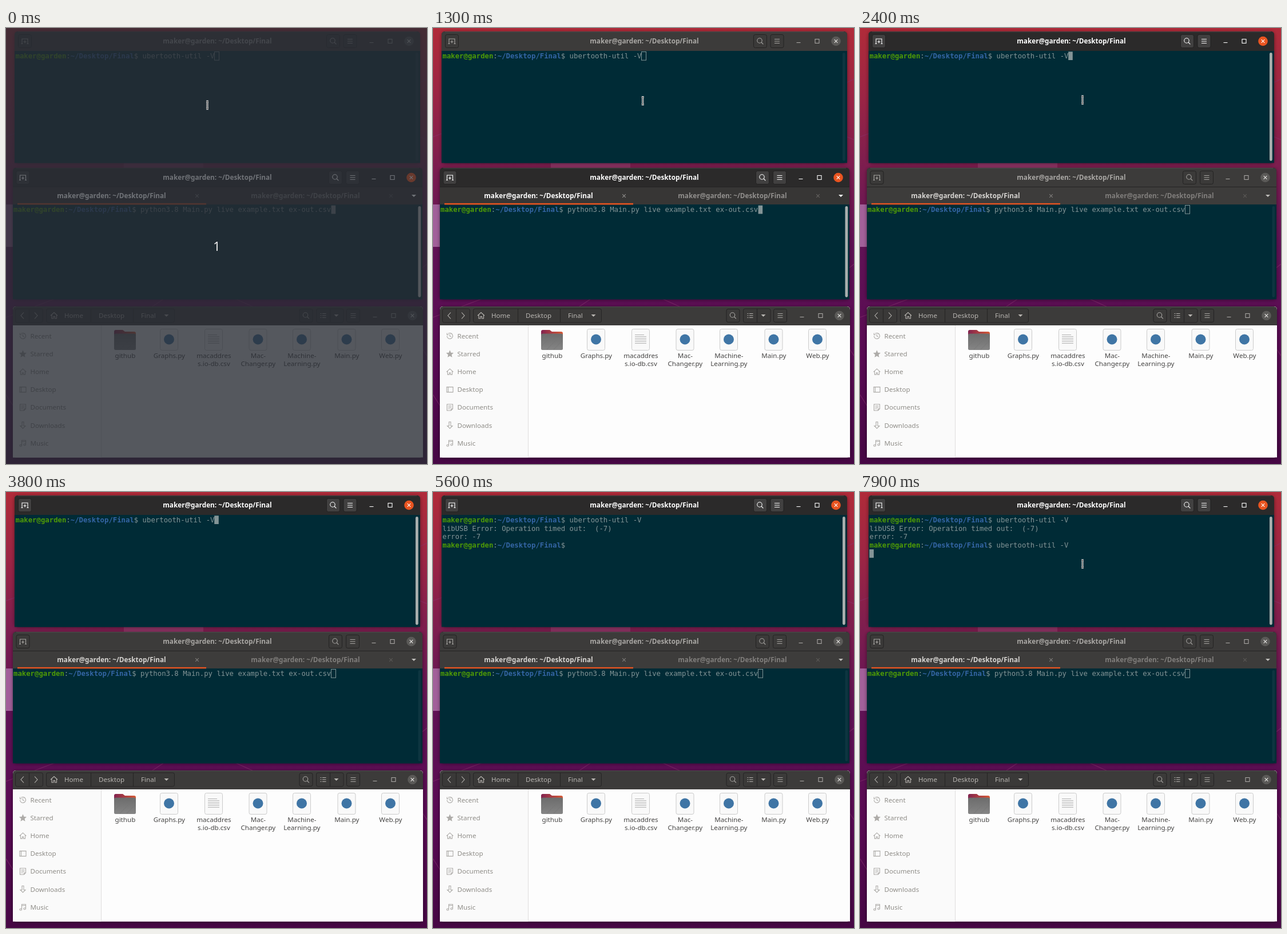
Animation of 736x761 px, one loop 8 s. Source, as an HTML page:

```html
<!DOCTYPE html>
<html lang="en">
<head>
<meta charset="utf-8">
<title>Desktop terminals</title>
<style>
html, body { margin: 0; width: 100%; height: 100%; overflow: hidden; background: #470845; }
svg { display: block; }
text { font-family: "Noto Sans", sans-serif; font-size: 11.6px; white-space: pre; }
.b { font-weight: 700; font-size: 11.75px; }
.t { font-family: "DejaVu Sans Mono", monospace; font-size: 12.3px; fill: #839496; }
.t .b { font-size: 12.3px; }
.m { text-anchor: middle; }
.l { fill: none; stroke-width: 1.1; }
</style>
</head>
<body>
<svg id="stage" width="736" height="761" viewBox="0 0 736 761" xmlns="http://www.w3.org/2000/svg"></svg>
<script>
const LOOP = 8000, COL = 7.4, ROW = 14.7;
const USER = 'maker@garden', DIR = '~/Desktop/Final';
const TITLE = `${USER}: ${DIR}`;
const BRIGHT = '#ffffff', FADED = '#a9a7a4', ORANGE = '#e95420';

const rect = (x, y, w, h, fill, extra = '') =>
  `<rect x="${x}" y="${y}" width="${w}" height="${h}" fill="${fill}" ${extra}/>`;
const line = (d, color, extra = '') => `<path class="l" d="${d}" stroke="${color}" ${extra}/>`;
const text = (x, y, str, fill, cls = '') =>
  `<text x="${x}" y="${y}" fill="${fill}" class="${cls}">${str}</text>`;
const group = (id, body, extra = '') => `<g id="${id}" ${extra}>${body}</g>`;
const down = (x, y, color) => `<path d="M${x - 4} ${y - 2}h8l-4 4z" fill="${color}"/>`;
const cross = (x, y, r, color) =>
  line(`M${x - r} ${y - r}l${2 * r} ${2 * r}M${x + r} ${y - r}l${-2 * r} ${2 * r}`, color);
const topRound = (x, y, w, h, fill) =>
  `<path d="M${x} ${y + h}v${6 - h}q0-6 6-6h${w - 12}q6 0 6 6v${h - 6}z" fill="${fill}"/>`;

const icons = {
  tab: (x, y, c) => line(`M${x - 5} ${y + 4.5}v-8.5h10v8.5M${x - 6.5} ${y + 4.5}h3M${x + 3.5} ${y + 4.5}h3M${x - 2.5} ${y + 1}h5M${x} ${y - 1.5}v5`, c),
  search: (x, y, c) => `<circle class="l" cx="${x - 1}" cy="${y - 1}" r="4.2" stroke="${c}"/>` +
    line(`M${x + 2} ${y + 2}l3.4 3.4`, c),
  menu: (x, y, c) => line(`M${x - 4.5} ${y - 3.5}h9m-9 3.5h9m-9 3.5h9`, c),
  list: (x, y, c) => line(`M${x - 5} ${y - 3.5}h2m1.5 0h6.5m-10 3.5h2m1.5 0h6.5m-10 3.5h2m1.5 0h6.5`, c, 'stroke-width="1.6"')
};

function button(kind, x, y, focus) {
  const fill = focus ? '#414040' : '#3b3a39';
  return rect(x - 11.5, y - 11.5, 23, 23, fill, 'rx="3" stroke="#232222"') +
    icons[kind](x, y, focus ? BRIGHT : FADED);
}

function controls(x, y, focus) {
  const c = focus ? BRIGHT : FADED;
  return line(`M${x - 69} ${y + 2.5}h7`, c) +
    `<rect class="l" x="${x - 36.5}" y="${y - 3.5}" width="7" height="7" stroke="${c}"/>` +
    `<circle cx="${x}" cy="${y}" r="8.3" fill="${focus ? ORANGE : '#5b5a58'}"/>` +
    cross(x, y, 2.8, focus ? BRIGHT : '#e8e6e3');
}

function header(x, y, w, h, cy, focus) {
  return topRound(x, y, w, h, focus ? '#2b2a2a' : '#3c3b3a') +
    line(`M${x + 6} ${y + .6}h${w - 12}`, focus ? '#403f3f' : '#4a4948') +
    text(369.5, cy + 4, TITLE, focus ? BRIGHT : FADED, 'b m');
}

const topButtons = f => button('tab', 33, 23, f) + button('search', 572, 23, f) + button('menu', 601.5, 23, f);
const midButtons = f => button('tab', 29.5, 261, f) + button('search', 576, 261, f) + button('menu', 606, 261, f);

const topBar = f => header(15, 6, 709, 34, 23, f) + controls(704.5, 23, f);

function midBar(f) {
  const c = f ? BRIGHT : '#d6d4d1', dim = f ? '#918f8d' : '#807e7c';
  return header(12, 244, 716, 34, 261, f) + controls(708.5, 261, f) + midButtons(f) +
    rect(12, 277, 716, 31, f ? '#373635' : '#3d3c3b') +
    line('M12 277.5h716', '#242323') +
    text(184.5, 297, TITLE, c, 'b m') + text(523.5, 297, TITLE, dim, 'b m') +
    cross(334, 293, 2.8, dim) + cross(673, 293, 2.8, f ? '#656361' : '#5c5a58') +
    down(713, 293, f ? BRIGHT : '#c0bebb') +
    rect(20, 305.8, 330, 2.4, ORANGE);
}

// Parts that stay a little lighter while the countdown shade is up
const midGlow = text(369.5, 265, TITLE, BRIGHT, 'b m') + text(184.5, 297, TITLE, BRIGHT, 'b m') +
  controls(708.5, 261, true) + icons.tab(29.5, 261, BRIGHT) + icons.search(576, 261, BRIGHT) +
  icons.menu(606, 261, BRIGHT) + down(713, 293, BRIGHT) +
  rect(720.5, 311, 4.8, 159, '#a9afae', 'rx="2.4"');

const term = (x, y, str) => `<text class="t" x="${x}" y="${y}">${str}</text>`;
const prompt = (x, y, cmd = '') => term(x, y,
  `<tspan class="b" fill="#4e9a06">${USER}</tspan>:<tspan class="b" fill="#3465a4">${DIR}</tspan>$ ${cmd}`);
const block = id => rect(0, 0, COL + .2, ROW, '#839496', `id="${id}"`);
const hollow = (id, x, y) =>
  rect(x + .5, y + .5, 8, ROW, 'none', `id="${id}" stroke="#839496"`);
const scroll = (id, x, y, h) => rect(x, y, 4.8, h, '#a9afae', `id="${id}" rx="2.4"`);

function wallpaper() {
  const stops = [[0, '#b02b39'], [.15, '#9c2544'], [.32, '#7c1d4f'], [.5, '#601255'], [.75, '#590a53'], [1, '#460744']];
  return `<defs><linearGradient id="sky" x2="0" y2="1">` +
    stops.map(([o, c]) => `<stop offset="${o}" stop-color="${c}"/>`).join('') +
    `</linearGradient><linearGradient id="back"><stop stop-color="#82234f"/><stop offset="1" stop-color="#d65a35"/></linearGradient>
    <linearGradient id="front" x2="0" y2="1"><stop stop-color="#6c6c6c"/><stop offset="1" stop-color="#858585"/></linearGradient>
    <filter id="shade" x="-5%" y="-10%" width="110%" height="120%"><feDropShadow dx="0" dy="1" stdDeviation="3" flood-opacity=".45"/></filter></defs>` +
    rect(0, 0, 736, 761, 'url(#sky)') +
    rect(0, 308, 14, 74, '#a2609a') + rect(206, 234, 139, 11, '#8d3263') +
    line('M0 190l16-6M0 505l90-34M250 490l30-20M395 470l40 18M724 95l12-6M724 190l12 5M726 420l10-8M0 640l14 22M728 560l8 12', '#8a3470', 'opacity=".6"');
}

function terminals() {
  const top = rect(15, 39, 709, 196.5, '#002b36') +
    rect(716, 43, 4.8, 189, '#0d3540', 'rx="2.4"') + scroll('topScroll', 716, 43, 189) +
    prompt(16.5, 53, 'ubertooth-util -V') +
    group('output', term(16.5, 53 + ROW, 'libUSB Error: Operation timed out:  (-7)') +
      term(16.5, 53 + 2 * ROW, 'error: -7') + prompt(16.5, 53 + 3 * ROW)) +
    group('again', term(16.5 + 30 * COL, 53 + 3 * ROW, 'ubertooth-util -V')) +
    block('cursor') + hollow('topHollow', 364, 41) +
    group('topOff', topBar(false)) + group('topOn', topBar(true)) +
    group('topBtnOff', topButtons(false)) + group('topBtnOn', topButtons(true));
  const mid = rect(12, 307, 716, 166.5, '#002b36') +
    rect(720.5, 311, 4.8, 159, '#0d3540', 'rx="2.4"') + scroll('midScroll', 720.5, 311, 159) +
    prompt(13, 321, 'python3.8 Main.py live example.txt ex-out.csv') +
    rect(568.6, 309.7, 7.6, ROW, '#839496', 'id="midBlock"') + hollow('midHollow', 568, 309) +
    midBar(false) + group('midOn', midBar(true));
  return `<g filter="url(#shade)">${rect(15, 6, 709, 229.5, '#002b36', 'rx="6"')}</g>${top}` +
    `<g filter="url(#shade)">${rect(12, 244, 716, 229.5, '#002b36', 'rx="6"')}</g>${mid}`;
}

const places = [
  ['Recent', 'M-5 0a5 5 0 1 0 2-4M-5-5v3h3M0-3v3.5l2.5 1'],
  ['Starred', 'M0-5l1.5 3.4 3.7.4-2.8 2.5.8 3.7L0 3.1-3.2 5l.8-3.7-2.8-2.5 3.7-.4z'],
  ['Home', 'M-6 .5l6-5.5 6 5.5M-4-1v6h3v-3h2v3h3v-6'],
  ['Desktop', 'M-5.5-4.5h11v9h-11zM-3-4.5v9'],
  ['Documents', 'M-5-5.5h10v8l-3 3h-7zM-3-2.5h6m-6 2.5h6m-6 2.5h3M5 2.5h-3v3'],
  ['Downloads', 'M-1.5-6v7h-3l4.5 4.5 4.5-4.5h-3v-7z'],
  ['Music', 'M-2 4v-9h7v7.5M-2-3h7M-2 4a1.8 1.5 0 1 1-3.6 0a1.8 1.5 0 1 1 3.6 0M5 2.5a1.8 1.5 0 1 1-3.6 0a1.8 1.5 0 1 1 3.6 0']
];

const files = [
  [208, 'dir', 'github'], [285, 'py', 'Graphs.py'], [363, 'csv', 'macaddres', 's.io-db.csv'],
  [440.5, 'py', 'Mac-', 'Changer.py'], [517, 'py', 'Machine-', 'Learning.py'],
  [595.5, 'py', 'Main.py'], [672, 'py', 'Web.py']
];

function fileIcon(x, kind) {
  if (kind === 'dir') {
    return `<path d="M${x - 19} 560v-30q0-3 3-3h12l4 3h16q3 0 3 3v27z" fill="url(#back)"/>` +
      rect(x - 19, 533.5, 38, 28.5, 'url(#front)', 'rx="2.5"') +
      line(`M${x - 18} 543l9-9M${x - 18} 555l21-21M${x - 9} 561l27-27M${x + 3} 561l15-15`, '#777', 'opacity=".5"');
  }
  const page = rect(x - 15.5, 525.5, 31, 37, '#f9f9f9', 'rx="3" stroke="#cbcbcb"');
  return page + (kind === 'py'
    ? `<circle cx="${x}" cy="543.5" r="9" fill="#3f75a5"/>`
    : line(`M${x - 10} 535.5h16` + [0, 1, 2, 3, 4].map(i => `M${x - 10} ${538.5 + 3 * i}h20`).join(''), '#b3b3b3'));
}

function fileWindow() {
  const c = '#b8b5b1', edge = 'rx="3" stroke="#262525"', face = '#3a3938';
  const bar = topRound(12, 486, 717, 33, '#3c3b3a') + line('M18 486.6h705', '#4a4948') +
    rect(16.5, 490, 48, 24, face, edge) + rect(70.5, 490, 224, 24, face, edge) +
    rect(542.5, 490, 47.5, 24, face, edge) +
    line('M40.5 490v24M148.5 490v24M222.5 490v24M566.5 490v24', '#262525') +
    line('M31 496.5l-5 5.5 5 5.5M50 496.5l5 5.5-5 5.5', c) +
    line('M78 502l6-5.5 6 5.5M80 501v6h3v-3.5h2.5v3.5h3v-6', c) +
    text(102, 506, 'Home', c) + text(162, 506, 'Desktop', c) + text(236, 506, 'Final', c) +
    down(280.5, 502, c) + button('search', 524.5, 502, false) +
    icons.list(554.5, 502, c) + down(577.5, 502, c) + button('menu', 607, 502, false) +
    controls(710.5, 502, false);
  const side = places.map(([name, d], i) => {
    const y = 537.5 + 31.2 * i;
    return line(d, '#adaba8', `transform="translate(29.5 ${y})" ${i === 1 ? 'style="fill:#adaba8"' : ''}`) +
      text(42.5, y + 4, name, '#8f8d88');
  }).join('');
  const grid = files.map(([x, kind, ...rows]) => fileIcon(x, kind) +
    rows.map((s, i) => text(x + .4, 576 + 14 * i, s, '#454443', 'm')).join('')).join('');
  return `<g filter="url(#shade)">${rect(12, 486, 717, 263.5, '#fdfdfd', 'rx="5"')}</g>` +
    rect(12, 518.5, 717, 231, '#fdfdfd') + rect(12, 518.5, 154, 231, '#fafafa') +
    line('M166.5 518.5v231', '#e0dfde') + bar + side + grid;
}

const beam = 'M-2-6.5h1.2l.8.6.8-.6h1.2M0-6v12M-2 6.5h1.2l.8-.6.8.6h1.2';
const pointer = group('pointer',
  line(beam, '#fff', 'style="stroke-width:3"') + line(beam, '#111', 'style="stroke-width:1"'));

const stage = document.getElementById('stage');
stage.innerHTML = wallpaper() + terminals() + fileWindow() +
  group('shadeUp', rect(0, 0, 736, 761, 'rgb(41,45,52)', 'opacity=".79"') +
    `<g opacity=".15">${midGlow}</g>` +
    '<text x="368.5" y="388.5" class="m" fill="#ececec" style="font-size:21.5px">1</text>') + pointer;

const el = {};
stage.querySelectorAll('[id]').forEach(n => el[n.id] = n);
const show = (id, on) => el[id].setAttribute('visibility', on ? 'visible' : 'hidden');
const fade = (id, v) => el[id].setAttribute('opacity', v);
const within = (t, a, b) => t >= a && t < b;

// Start time, column and row of the text cursor; null hides it
const cursorSteps = [
  [0, null], [2000, 47, 0], [3900, 0, 1], [4400, null], [5000, 0, 1], [5300, 30, 3],
  [5600, null], [6200, 30, 3], [6400, 47, 3], [6700, 0, 4], [7300, null], [7900, 0, 4]
];
const pointerSteps = [[0, 352, 134.5], [100, 361, 130], [200, 366.7, 127], [1700, 380, 126], [1800, 389, 125.5]];
const current = (steps, t) => steps.filter(s => s[0] <= t).pop();

function draw(now) {
  const t = now % LOOP, swapped = t >= 2000;
  const step = Math.min(4, Math.max(0, Math.floor((t - 2000) / 100)));
  const k = 1 - (1 - step / 4) ** 2;

  show('shadeUp', t < 1300);
  show('topOn', swapped);
  show('topScroll', swapped);
  show('midScroll', !swapped);
  show('topHollow', !swapped);
  show('midBlock', !swapped);
  show('midHollow', swapped);
  fade('topBtnOn', k);
  fade('midOn', 1 - k);

  show('output', t >= 5300);
  show('again', t >= 6400);
  const [, col, row] = current(cursorSteps, t);
  show('cursor', col !== null);
  if (col !== null) {
    el.cursor.setAttribute('x', 16.4 + col * COL);
    el.cursor.setAttribute('y', 41.3 + row * ROW);
  }

  const [, px, py] = current(pointerSteps, t);
  show('pointer', !within(t, 3800, 6800));
  el.pointer.setAttribute('transform', `translate(${px} ${py})`);
}

function tick() {
  draw(performance.now());
  requestAnimationFrame(tick);
}
tick();
</script>
</body>
</html>
```
